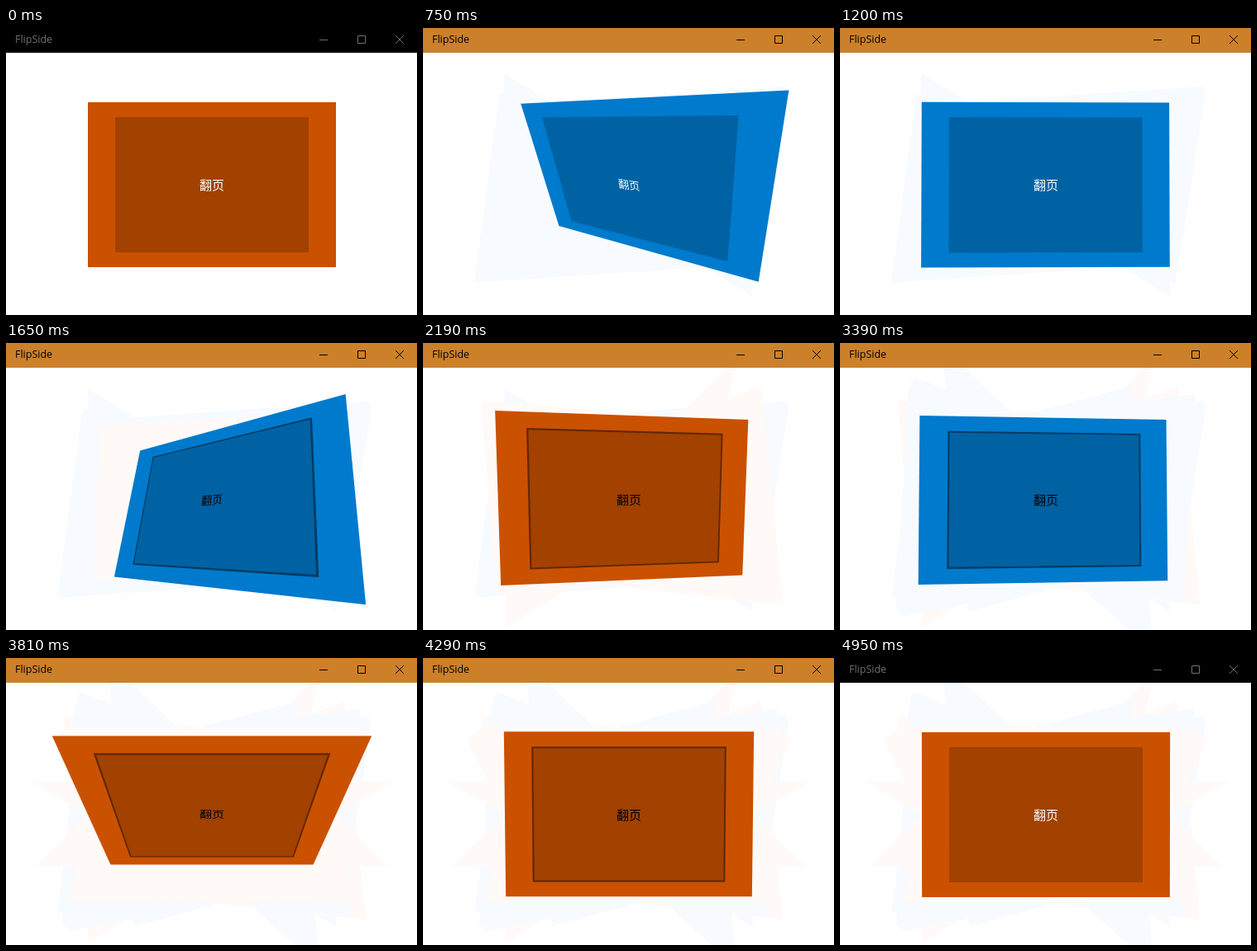
Write an HTML page with a canvas that moves like this. It is 497 by 348 pixels and loops after 4980 ms.

```html
<!DOCTYPE html>
<html lang="zh-CN">
<head>
<meta charset="utf-8">
<title>FlipSide</title>
<style>
  html, body { margin: 0; width: 100%; height: 100%; overflow: hidden; background: #fff; }
  canvas { display: block; width: 497px; height: 348px; }
</style>
</head>
<body>
<canvas id="stage" width="497" height="348"></canvas>
<script>
const ctx = document.getElementById('stage').getContext('2d');
const W = 497, H = 348, LOOP = 4980, STEP = 30;
const CX = 249, CY = 190, DEPTH = 300;
const ACTIVE_FROM = 480, ACTIVE_TO = 4800;

const SIDES = [
  { fill: '#ca5100', trail: '#fffaf7', hoverFrom: 300 },
  { fill: '#007acc', trail: '#f7fbff', hoverFrom: 1230 }
];

// Each flip turns the card half a turn about an axis lying in its plane.
const FLIPS = [
  { start: 520, axis: [-0.684, -0.73] },
  { start: 1595, axis: [0.515, -0.857] },
  { start: 2620, axis: [0.337, 0.942] },
  { start: 3577, axis: [-1, 0] }
];

// Underdamped spring from 0 to 1.
const DAMPING = 0.4, FREQ = 0.012;
const DECAY = DAMPING / Math.sqrt(1 - DAMPING * DAMPING);
function spring(ms) {
  const p = ms * FREQ;
  return 1 - Math.exp(-DECAY * p) * (Math.cos(p) + DECAY * Math.sin(p));
}

function poseAt(t) {
  let n = FLIPS.length - 1;
  while (n >= 0 && t < FLIPS[n].start) n--;
  if (n < 0) return { side: 0, angle: 0, axis: [1, 0] };
  const turn = Math.PI * spring(t - FLIPS[n].start);
  const flipped = turn >= Math.PI / 2;
  return {
    side: (flipped ? n + 1 : n) % 2,
    angle: flipped ? turn - Math.PI : turn,
    axis: FLIPS[n].axis
  };
}

// Images of the card's x and y unit vectors.
function basis({ angle, axis: [ax, ay] }) {
  const c = Math.cos(angle), s = Math.sin(angle), k = 1 - c;
  return {
    u: [c + k * ax * ax, k * ax * ay, -s * ay],
    v: [k * ax * ay, c + k * ay * ay, s * ax]
  };
}

function addQuad({ u, v }, hw, hh) {
  [[-hw, -hh], [hw, -hh], [hw, hh], [-hw, hh]].forEach(([x, y], i) => {
    const [px, py, pz] = u.map((a, j) => a * x + v[j] * y);
    const k = DEPTH / (DEPTH - pz);
    ctx[i ? 'lineTo' : 'moveTo'](CX + px * k, CY + py * k);
  });
  ctx.closePath();
}

function fillQuad(b, hw, hh, color) {
  ctx.fillStyle = color;
  ctx.beginPath();
  addQuad(b, hw, hh);
  ctx.fill();
}

// Faint marks left behind by earlier poses.
function drawTrail(t) {
  FLIPS.forEach(({ start }, n) => {
    const color = SIDES[(n + 1) % 2].trail;
    const end = Math.min(t, start + 600);
    for (let s = Math.ceil(start / STEP) * STEP; s < end; s += STEP) {
      fillQuad(basis(poseAt(s)), 150, 100, color);
    }
  });
}

function drawCard(t) {
  const pose = poseAt(t), side = SIDES[pose.side], b = basis(pose);
  const hover = t >= side.hoverFrom && t < ACTIVE_TO;
  fillQuad(b, 150, 100, side.fill);
  fillQuad(b, 117, 82, 'rgba(0,0,0,0.2)');
  if (hover) {
    ctx.fillStyle = 'rgba(0,0,0,0.4)';
    ctx.beginPath();
    addQuad(b, 117, 82);
    addQuad(b, 115, 80);
    ctx.fill('evenodd');
  }
  ctx.save();
  ctx.transform(b.u[0], b.u[1], b.v[0], b.v[1], CX, CY);
  ctx.fillStyle = hover ? '#000' : '#fff';
  ctx.font = '15px "Noto Sans CJK SC", "Noto Sans CJK", sans-serif';
  ctx.textAlign = 'center';
  ctx.fillText('翻页', 0, 6);
  ctx.restore();
}

function drawTitleBar(t) {
  const active = t >= ACTIVE_FROM && t < ACTIVE_TO;
  const ink = active ? '#000' : '#707070';
  ctx.fillStyle = active ? '#cc802a' : '#000';
  ctx.fillRect(0, 0, W, 30);
  ctx.fillStyle = ink;
  ctx.font = '12.5px "Open Sans", "Noto Sans", sans-serif';
  ctx.textAlign = 'left';
  ctx.fillText('FlipSide', 11, 18);

  ctx.strokeStyle = ink;
  ctx.lineWidth = 1;
  ctx.beginPath();
  ctx.moveTo(379, 14.5);
  ctx.lineTo(389, 14.5);
  ctx.rect(425.5, 9.5, 9, 9);
  ctx.moveTo(471, 9);
  ctx.lineTo(481, 19);
  ctx.moveTo(481, 9);
  ctx.lineTo(471, 19);
  ctx.stroke();
}

function draw(now) {
  const t = Math.floor((now % LOOP) / STEP) * STEP;
  ctx.fillStyle = '#fff';
  ctx.fillRect(0, 0, W, H);
  drawTrail(t);
  drawCard(t);
  drawTitleBar(t);
}

const origin = performance.now();
function tick() {
  draw(performance.now() - origin);
  requestAnimationFrame(tick);
}
tick();
</script>
</body>
</html>
```
